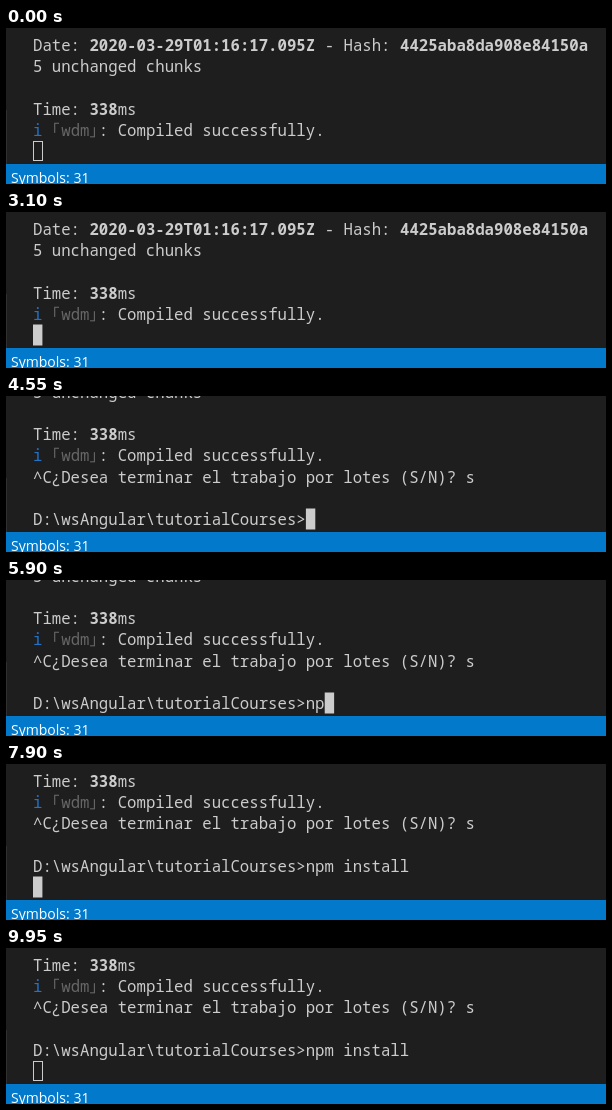
Write an HTML page with a canvas that moves like this. It is 600 px wide and 156 px high and loops after 10 s.

```html
<!DOCTYPE html>
<html lang="es">
<head>
<meta charset="utf-8">
<title>Terminal</title>
<style>
html, body { margin: 0; width: 100%; height: 100%; overflow: hidden; background: #1e1e1e; }
canvas { display: block; }
</style>
</head>
<body>
<canvas id="stage" width="600" height="156"></canvas>
<script>
const ctx = document.getElementById('stage').getContext('2d');
const LOOP = 10000, LEFT = 27, CELL = 9.41, PITCH = 21.2, BASELINE = 23;
const MONO = '15.68px "Noto Sans Mono", monospace';
const TEXT = '#cccccc', DIM = '#666666', BLUE = '#2472c8';

const FOCUS = 2600, BLUR = 8900;
const QUESTION = 3450, ANSWER = 4000, PROMPT = 4350, RUN = 7600;
const COMMAND = 'npm install';
const KEY_TIMES = [5700, 5850, 6050, 6200, 6500, 6650, 6800, 6950, 7100, 7200, 7300];

// Each line is a list of runs: [text, colour, bold]
const LOG = [
  [['Date: '], ['2020-03-29T01:16:17.095Z', TEXT, true], [' - Hash: '], ['4425aba8da908e84150a', TEXT, true]],
  [['5 unchanged chunks']],
  [],
  [['Time: '], ['338', TEXT, true], ['ms']],
  [['i', BLUE], [' '], ['｢', DIM], ['wdm', DIM], ['｣', DIM], [': Compiled successfully.']]
];

function screenAt(t) {
  const lines = [...LOG];
  if (t < QUESTION) lines.push([]);
  else lines.push([['^C¿Desea terminar el trabajo por lotes (S/N)? ' + (t >= ANSWER ? 's' : '')]]);
  if (t >= PROMPT) {
    const typed = KEY_TIMES.filter(k => k <= t).length;
    lines.push([], [['D:\\wsAngular\\tutorialCourses>' + COMMAND.slice(0, typed)]]);
  }
  if (t >= RUN) lines.push([]);
  return lines.slice(-6 - 1);
}

// Draws one line and returns the x where it ends
function drawLine(runs, y) {
  let x = LEFT;
  for (const [text, colour = TEXT, bold] of runs) {
    ctx.font = (bold ? 'bold ' : '') + MONO;
    ctx.fillStyle = colour;
    ctx.fillText(text, x, y);
    x += text.length * CELL;
  }
  return x;
}

function drawCursor(x, y, focused) {
  if (focused) {
    ctx.fillStyle = TEXT;
    ctx.fillRect(x, y - 16.5, CELL, PITCH - 0.2);
  } else {
    ctx.strokeStyle = TEXT;
    ctx.strokeRect(Math.round(x) + 0.5, Math.round(y) - 15.5, 9, 19);
  }
}

function drawStatusBar() {
  ctx.fillStyle = '#0279cb';
  ctx.fillRect(0, 136, 600, 20);
  ctx.fillStyle = '#ffffff';
  ctx.font = '14px "Open Sans", sans-serif';
  ctx.fillText('Symbols: 31', 5, 155);
}

function draw(t) {
  ctx.fillStyle = '#1e1e1e';
  ctx.fillRect(0, 0, 600, 156);
  ctx.fillStyle = '#303030';
  ctx.fillRect(0, 82, 1, 54);

  const lines = screenAt(t);
  let end = LEFT;
  lines.forEach((runs, i) => {
    end = drawLine(runs, BASELINE + (i + 6 - lines.length) * PITCH);
  });
  drawCursor(end, BASELINE + 5 * PITCH, t >= FOCUS && t < BLUR);
  drawStatusBar();
}

function frame() {
  draw(performance.now() % LOOP);
  requestAnimationFrame(frame);
}
frame();
</script>
</body>
</html>
```
